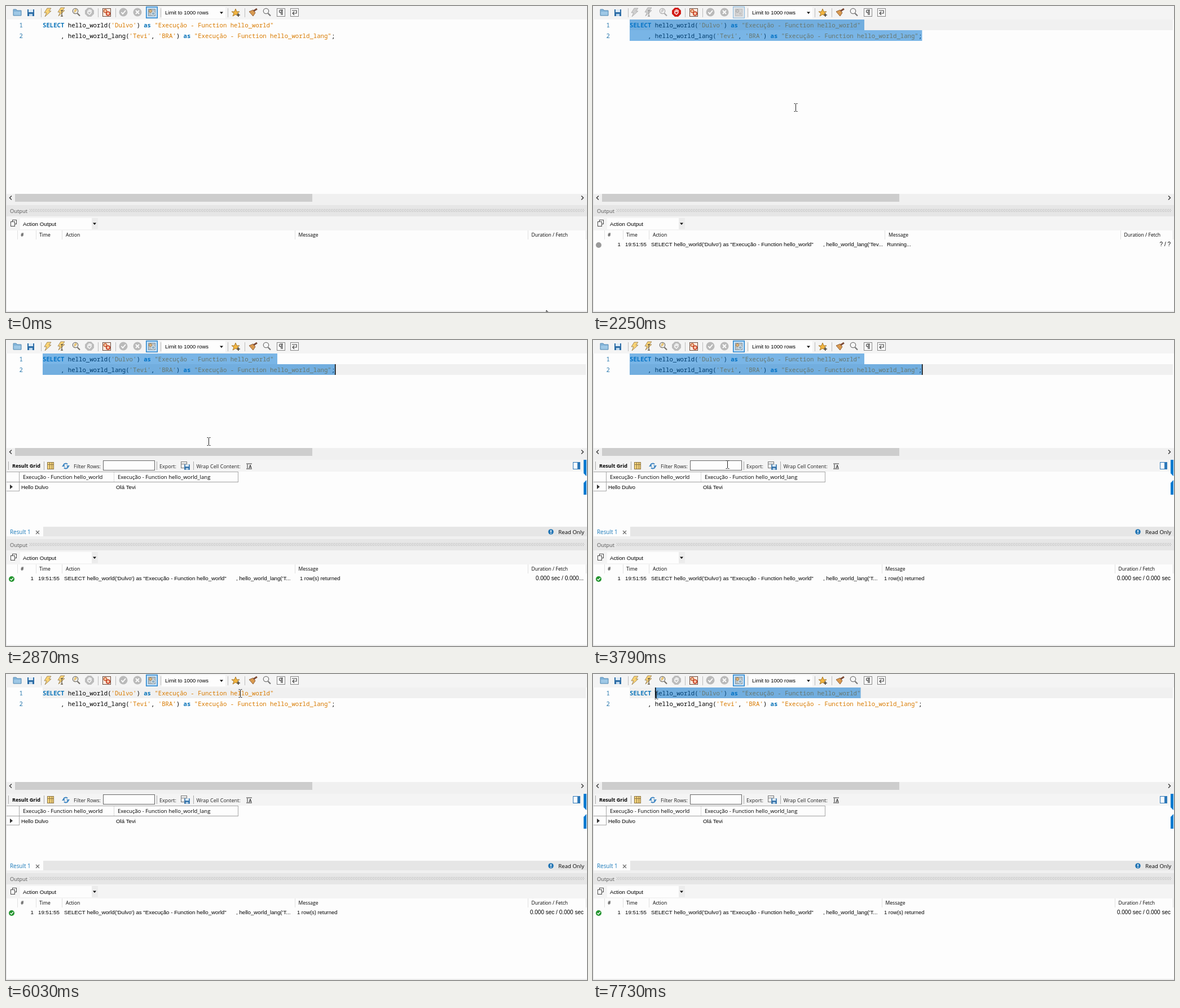
Animation, 1030 px wide and 544 px high, one loop 8 s. Source, as an HTML page with a canvas:

```html
<!DOCTYPE html>
<html lang="pt">
<head>
<meta charset="utf-8">
<style>
html, body { margin: 0; width: 100%; height: 100%; overflow: hidden; background: #fdfdfd; }
canvas { display: block; }
</style>
</head>
<body>
<canvas id="stage" width="1030" height="544"></canvas>
<script>
const ctx = document.getElementById('stage').getContext('2d');
const LOOP = 8000;
const MONO = '"Noto Sans Mono", monospace', UI = '"Open Sans", sans-serif', LIST = '"Liberation Sans", sans-serif';
const PAPER = '#fdfdfd', BAR = '#f4f4f4', FACE = '#f0f0f0', TITLE = '#e6e6e6', INK = '#000';
const CODE_X = 65, CHAR = 6.4, ROW_Y = 24, ROW_H = 19;
const FIRST = 'Dulvo', SECOND = 'Tevi';
const LINES = [
  `SELECT hello_world('${FIRST}') as "Execução - Function hello_world"`,
  `     , hello_world_lang('${SECOND}', 'BRA') as "Execução - Function hello_world_lang";`
];

// Pointer path: time, x, y of the hot spot
const POINTER = [
  [0, 958, 541], [70, 930, 515], [420, 102, 51], [630, 359, 180], [3400, 359, 180],
  [4190, 114, 264], [4260, 114, 264], [4490, 129, 267], [4640, 133, 262], [4800, 188, 217],
  [5410, 276, 46], [5570, 276, 39], [5720, 280, 39], [6180, 480, 31], [6350, 480, 32],
  [6700, 330, 58], [6960, 159, 49], [7110, 132, 38], [7730, 112, 37], [LOOP, 112, 37]
];

function pointerAt(t) {
  const i = POINTER.findIndex(k => k[0] > t);
  const [t0, x0, y0] = POINTER[i - 1], [t1, x1, y1] = POINTER[i];
  const f = (t - t0) / (t1 - t0);
  return { x: Math.round(x0 + (x1 - x0) * f), y: Math.round(y0 + (y1 - y0) * f) };
}

function box(x, y, w, h, fill, stroke) {
  if (fill) { ctx.fillStyle = fill; ctx.fillRect(x, y, w, h); }
  if (stroke) { ctx.strokeStyle = stroke; ctx.lineWidth = 1; ctx.strokeRect(x + .5, y + .5, w - 1, h - 1); }
}

function text(s, x, y, size, color = INK, family = UI, weight = '', align = 'left') {
  ctx.font = `${weight} ${size}px ${family}`;
  ctx.fillStyle = color;
  ctx.textAlign = align;
  ctx.fillText(s, x, y);
}

function shape(x, y, d, fill, stroke, width = 1) {
  const path = new Path2D(d);
  ctx.save();
  ctx.translate(x, y);
  if (fill) { ctx.fillStyle = fill; ctx.fill(path); }
  if (stroke) { ctx.strokeStyle = stroke; ctx.lineWidth = width; ctx.stroke(path); }
  ctx.restore();
}

function disc(x, y, r, fill, stroke, width = 1) {
  shape(x, y, `M${-r} 0a${r} ${r} 0 1 0 ${2 * r} 0a${r} ${r} 0 1 0 ${-2 * r} 0`, fill, stroke, width);
}

const dropArrow = (x, y) => shape(x, y, 'M-3-1.5H3L0 2Z', INK);
const separators = (xs, y, h, color = '#bcbcbc') => xs.forEach(x => box(x, y, 1, h, color));

function bolt(x, y, off, scale = 1) {
  ctx.save();
  ctx.translate(x, y);
  ctx.scale(scale, scale);
  shape(0, 0, 'M-1-7H6L2-2H6L-5 8-2 1H-6Z', off ? '#cfcfcf' : '#fbd474', off ? '#b0b0b0' : '#a48a5c');
  ctx.restore();
}

function magnifier(x, y, color) {
  disc(x - 1, y - 2, 4.7, '#f6f6f6', color, 1.3);
  shape(x, y, 'M2.5 2 7 6.5', null, color, 2.2);
}

function diskette(x, y) {
  box(x - 6, y - 6, 12, 12, '#2d6da6');
  box(x - 4, y - 6, 8, 5, '#dcebf7');
  box(x - 3, y + 2, 6, 4, '#bcd6ec');
}

function toolbar(busy) {
  box(0, 0, 1030, 24, BAR);
  separators([62, 163, 194, 274, 393, 423], 4, 16);
  shape(20, 11, 'M-7-5H-2L0-3H7V6H-7Z', '#83b4d9', '#5b8db5');
  box(14, 10, 12, 6, '#9fc8e6');
  diskette(44, 12);
  bolt(74, 11, busy);
  bolt(98, 10, busy);
  shape(99, 13, 'M-2-5H2M0-5V5M-2 5H2', null, busy ? '#999' : '#665b48', 1.3);
  magnifier(124, 11, busy ? '#aaa' : '#77736c');
  bolt(123, 9, busy, .45);
  shape(148, 11, 'M-3-8H3L8-3V3L3 8H-3L-8 3V-3Z', busy ? '#d21c16' : '#bcbcbc');
  shape(148, 11, 'M-3 2V-3M-1 0V-5M1 0V-5M3 1V-4M-4 1 0 4 3 1', null, '#fff', 1.4);
  box(171, 4, 15, 15, '#f9ebe1', '#6d4b3b');
  disc(176, 9, 2.8, '#f3c7a8', '#c65a2a', 1.4);
  disc(181, 13.5, 3.2, '#f3c7a8', '#c8391f', 1.6);
  disc(208, 11, 7.5, '#bababa');
  shape(208, 11, 'M-3.5 0-1 3 4-3', null, '#fff', 1.8);
  disc(233, 11, 7.5, '#bababa');
  shape(233, 11, 'M-3-3 3 3M3-3-3 3', null, '#fff', 1.8);

  box(248, 1, 21, 21, busy ? '#dfe3e6' : '#cbe4f8', busy ? '#86b9df' : '#2481ca');
  if (!busy) box(249, 2, 19, 19, null, '#75b4e5');
  box(252, 5, 13, 13, busy ? '#d2d2d2' : '#b9c3c8', busy ? '#bbb' : '#84949e');
  disc(256, 9, 2.6, busy ? '#c8c8c8' : '#dfb67c', busy ? '#aaa' : '#a5855c');
  disc(261, 13.5, 3, busy ? '#c4c4c4' : '#8fb0c6', busy ? '#ddd' : '#eef4f8');

  box(276, 2, 113, 20, PAPER);
  text('Limit to 1000 rows', 282, 15, 9.5, INK, LIST);
  dropArrow(382, 12);
  shape(407, 12, 'M0-7 2-2H7L3 1 5 6 0 3-5 6-3 1-7-2H-2Z', '#f3b63f', '#a9792b');
  shape(412, 16, 'M-3 0H3M0-3V3', null, '#4d4a44', 1.6);
  shape(438, 11, 'M-7-1 0-4 4 1 0 7Z', '#d99a50', '#8e603a');
  shape(438, 11, 'M1-2 7-6', null, '#7b4934', 3);
  magnifier(462, 11, '#777');
  for (const x of [487, 511]) box(x - 7, 4, 15, 15, '#fafafa', '#858585');
  shape(487, 11, 'M4-4H0A2 2 0 0 0 0 1H1M1-4V5M3-4V5', null, '#444', 1.2);
  shape(511, 11, 'M-4-3H4V2H-2M0-1-3 2 0 5', null, '#444', 1.2);
}

function editor(s) {
  box(0, 24, 1030, s.bottom - 24, PAPER);
  if (s.row !== null) box(CODE_X, ROW_Y + s.row * ROW_H, 963, ROW_H, FACE);
  LINES.forEach((line, i) => {
    const y = 37.5 + i * ROW_H;
    text(i + 1, 30, y, 10.67, '#2878ad', MONO, '', 'right');
    for (const m of line.matchAll(/(["'].*?["'])|(\bSELECT\b|\bas\b)|\w+|[^\w\s"']+/g)) {
      const color = m[1] ? '#d97b00' : m[2] ? '#0873b9' : INK;
      text(m[0], CODE_X + m.index * CHAR, y, 10.67, color, MONO, m[2] ? 'bold' : '');
    }
  });
  for (const [row, from, to] of s.selection)
    box(CODE_X + from * CHAR, ROW_Y + row * ROW_H, (to - from) * CHAR, ROW_H, 'rgba(0,115,210,.52)');
  if (s.caret) box(Math.round(CODE_X + s.caret[1] * CHAR), ROW_Y + s.caret[0] * ROW_H, 1.5, ROW_H, '#000');

  box(0, s.bottom, 1030, 21, FACE);
  box(16, s.bottom, 527, 14, '#cdcdcd');
  shape(8, s.bottom + 7, 'M2-3.5-1.5 0 2 3.5', null, '#444', 1.6);
  shape(1022, s.bottom + 7, 'M-2-3.5 1.5 0-2 3.5', null, '#444', 1.6);
}

function emptyResult() {
  box(0, 207, 1030, 147, FACE);
  box(92, 213, 938, 119, PAPER);
  box(1, 304, 87, 28, '#e5e5e5');
}

function resultGrid() {
  box(0, 207, 1030, 6, FACE);
  box(0, 213, 1030, 21, BAR);
  box(0, 234, 1030, 98, PAPER);
  separators([4, 67, 267, 332], 216, 15, '#aaa');
  text('Result Grid', 11, 227, 9.05, INK, UI, 'bold');
  box(73, 217, 12, 13, '#f2d27b', '#8c7445');
  separators([77, 81], 218, 11, '#8c7445');
  box(74, 221, 10, 1, '#8c7445');
  shape(106, 224, 'M-4 0A4 4 0 0 1 3-3M4 0A4 4 0 0 1-3 3', null, '#3f86c2', 2);
  shape(106, 224, 'M1-1H7L4 3ZM-1 1H-7L-4-3Z', '#3f86c2');
  text('Filter Rows:', 120, 227.5, 9, '#222');
  box(172, 214, 92, 18, PAPER, '#666');
  text('Export:', 272, 227.5, 9, '#222');
  box(310, 216, 11, 12, '#eee', '#777');
  box(311, 220, 9, 1, '#888');
  ctx.save();
  ctx.translate(321, 226);
  ctx.scale(.8, .8);
  diskette(0, 0);
  ctx.restore();
  text('Wrap Cell Content:', 337.5, 227.5, 9, '#222');
  shape(431, 224, 'M-5-4H5M-5 5H5M-3-3V4M0 4 2-2 4 4M1 2H4', null, '#333');
  box(1005, 217, 13, 13, '#fff', '#2d78b9');
  box(1013, 218, 4, 11, '#2d78b9');
  shape(1024, 213, 'M0 0H5V29L0 24ZM5 36 0 41V62H5Z', '#0a7bd0');

  separators([23], 235, 33, '#a8a8a8');
  separators([191], 235, 17, '#d8d8d8');
  separators([411], 235, 17, '#a8a8a8');
  box(1, 234, 411, 1, '#a8a8a8');
  box(1, 252, 411, 1, '#a0a0a0');
  box(1, 268, 23, 1, '#a8a8a8');
  text('Execução - Function hello_world', 30, 247, 9.5);
  text('Execução - Function hello_world_lang', 198, 247, 9.5);
  shape(8, 261, 'M-1-4 4 0-1 4Z', '#333');
  text('Hello ' + FIRST, 27, 265, 9.4, INK, LIST);
  text('Olá ' + SECOND, 195, 265, 9.7, INK, LIST);

  box(0, 332, 1030, 17, TITLE);
  box(0, 349, 1030, 6, FACE);
  box(1, 332, 65, 17, PAPER);
  text('Result 1', 7, 344.5, 9.9, '#1677b8');
  shape(56, 342, 'M-3-3 3 3M3-3-3 3', null, '#666', 1.1);
  disc(966, 341, 4.8, '#2778b6');
  box(965.3, 338, 1.6, 4, '#fff');
  box(965.3, 343, 1.6, 1.4, '#fff');
  text('Read Only', 1025, 345, 9.6, INK, UI, '', 'right');
}

function output(t) {
  box(0, 354, 1030, 20, TITLE);
  text('Output', 7, 368, 9.35, '#555');
  for (let y = 361; y < 367; y += 2)
    for (let x = 42 + (y - 361) % 4 / 2; x < 1025; x += 3) box(x, y, 1, 1, '#a2a2a2');
  box(0, 374, 1030, 25, BAR);
  box(11, 380, 8, 8, '#fff', '#444');
  box(8, 383, 8, 9, '#fff', '#444');
  box(25, 377, 127, 20, PAPER);
  box(152, 377, 11, 20, '#ececec');
  text('Action Output', 30, 390.5, 9.72, INK, LIST);
  dropArrow(157, 387);

  const wide = t >= 2250 && t < 2790;
  box(0, 399, 1030, 143, PAPER);
  separators([20, 53, 99, wide ? 517 : 512, wide ? 935 : 925, 1028], 399, 16, '#e0e0e0');
  const headings = [['#', 26], ['Time', 59], ['Action', 106], ['Message', wide ? 524 : 518.5], ['Duration / Fetch', wide ? 941.5 : 931.5]];
  for (const [label, x] of headings) text(label, x, 410, 8.6);
  box(0, 542, 1030, 2, '#ececec');
  if (t < 2250) return;

  const done = t >= 2330, settled = t >= 2940;
  disc(10, 425, 5, done ? '#24952f' : '#9a9a9a');
  if (done) shape(10, 425, 'M-2.5 0-.5 2 2.8-2', null, '#fff', 1.4);
  text('1', 49, 427, 9.72, INK, LIST, '', 'right');
  text('19:51:55', 57, 427, 9.72, INK, LIST);
  text(LINES[0], 103, 427, 9.72, INK, LIST);
  text(`, hello_world_lang('${SECOND.slice(0, wide ? 3 : 1)}...`, 408, 427, 9.72, INK, LIST);
  text(done ? '1 row(s) returned' : 'Running...', settled ? 516 : 521, 427, 9.4, INK, LIST);
  const duration = !done ? '? / ?' : settled ? '0.000 sec / 0.000 sec' : '0.000 sec / 0.000...';
  text(duration, 1024, 427, 10, INK, LIST, '', 'right');
}

function pointer(p, editorBottom) {
  const overFilter = editorBottom < 300 && p.x > 172 && p.x < 264 && p.y > 213 && p.y < 233;
  if (p.y < editorBottom || overFilter)
    shape(p.x + .5, p.y + .5, 'M-3-7H-1L0-6 1-7H3M0-6V6M-3 7H-1L0 6 1 7H3', null, '#222');
  else
    shape(p.x, p.y, 'M0 0V16L4 12.5 6.5 18.5 9 17.5 6.5 11.7H11.5Z', '#fff', '#111');
}

function editorState(t, p) {
  const state = { bottom: t < 2640 ? 334 : 192, row: null, selection: [], caret: null };
  if (t >= 940) state.row = t >= 2790 && t < 5490 ? 1 : 0;
  if (t >= 940 && t < 5490) state.selection = [[0, 0, 65], [1, 0, 81]];
  if (t >= 940 && t < 1200 || t >= 1700 && t < 2250) state.caret = [0, 0];
  if (t >= 2790 && t < 5490 && Math.floor((t - 2750) / 502) % 2 === 0) state.caret = [1, 81];
  if (t >= 5490 && t < 5990) state.caret = [0, 33];
  if (t >= 6350) {
    const row = p.y > 43 ? 1 : 0, col = Math.min(64, Math.round((p.x - CODE_X) / CHAR));
    state.row = row;
    if (!row) state.caret = [row, col];
    state.selection = row ? [[0, 64, 65], [1, 0, col]] : [[0, col, 64]];
  }
  return state;
}

function draw(now) {
  const t = now % LOOP, p = pointerAt(t), state = editorState(t, p);
  box(0, 0, 1030, 544, PAPER);
  toolbar(t >= 2250 && t < 2790);
  editor(state);
  if (t >= 2790) resultGrid();
  else if (t >= 2640) emptyResult();
  output(t);
  box(0, 24, 1, 520, '#e3e3e3');
  pointer(p, state.bottom);
}

let start;
function tick(now) {
  start ??= now;
  draw(Math.max(0, now - start));
  requestAnimationFrame(tick);
}
requestAnimationFrame(tick);
</script>
</body>
</html>
```
